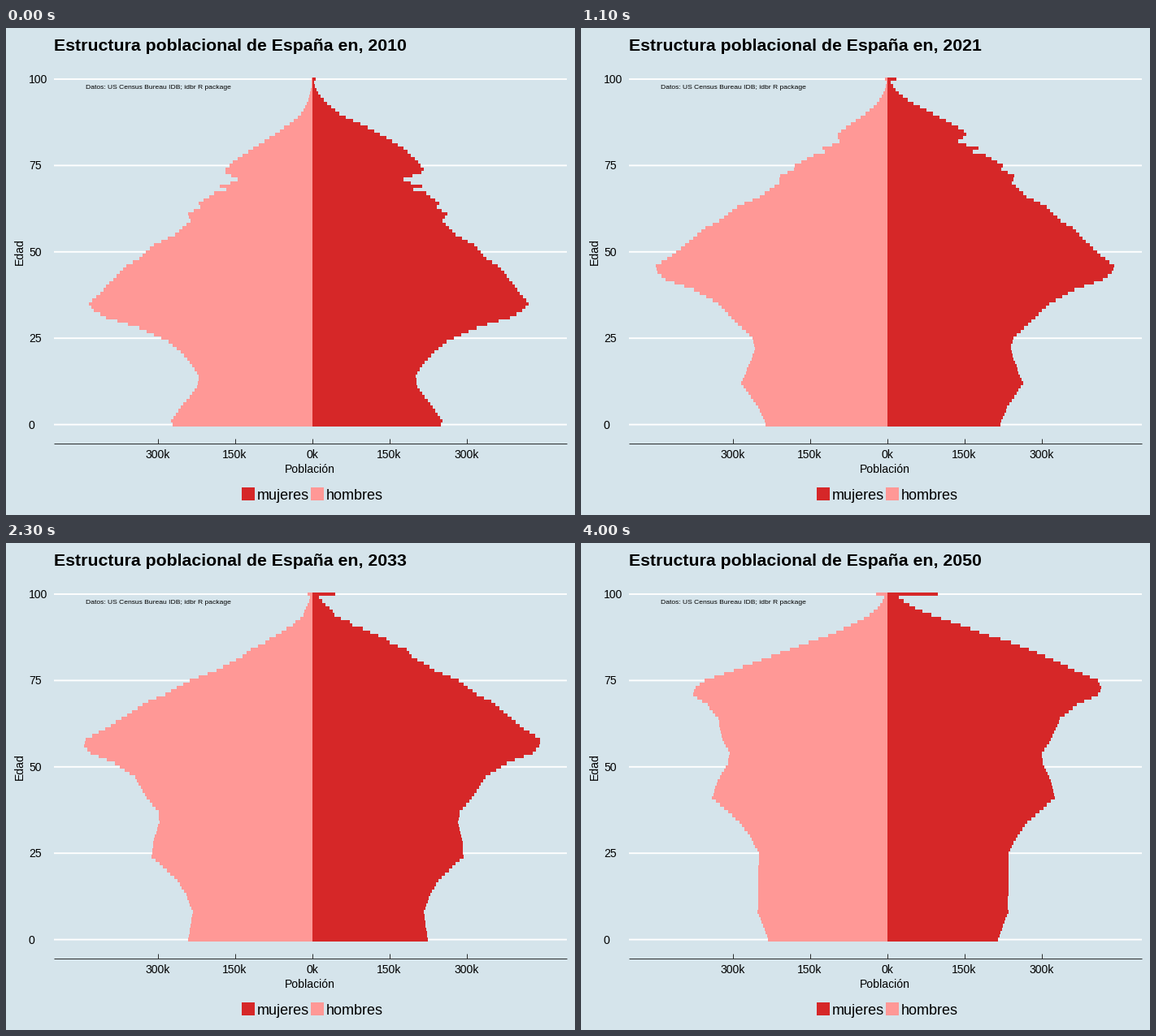
Recreate the animation shown at these times as a matplotlib script. Size 700 by 600 pixels, loop 4100 ms.

```python
import numpy as np
import matplotlib.pyplot as plt
from matplotlib.animation import FuncAnimation
from matplotlib.patches import Rectangle

plt.rcParams["font.family"] = "Liberation Sans"

W, H, DPI = 700, 600, 100
PT = 72 / DPI                      # points per pixel
BG, RED, PINK, INK = "#d5e4eb", "#d62728", "#ff9896", "#2b2e2f"
X0, LEFT, RIGHT = 377, 59, 690
Y0, STEP = 488.6, 4.256            # age 0 and pixels per year of age
AXIS_Y = 511.5
FIRST, LAST = 2010, 2050

# Birth year and full size of the cohort, as a bar length in pixels
COHORT_KEYS = [
    (1911, 85), (1920, 102), (1924, 130), (1930, 149), (1936, 155),
    (1937, 150), (1939, 122), (1940, 130), (1941, 144), (1942, 131),
    (1943, 147), (1946, 161), (1947, 157), (1949, 170), (1951, 163),
    (1955, 178), (1958, 201), (1962, 216), (1964, 231), (1968, 247),
    (1972, 265), (1975, 284), (1977, 283), (1979, 274), (1982, 242),
    (1986, 217), (1992, 204), (1996, 192), (1999, 193), (2004, 204),
    (2009, 210), (2012, 196), (2016, 178), (2020, 167), (2025, 159),
    (2036, 168), (2042, 171), (2050, 159)]
# Men per woman by birth year
RATIO_KEYS = [(1920, 0.72), (1934, 0.91), (1960, 1.005), (1976, 1.03),
              (2020, 1.055)]


def through(x, keys):
    return np.interp(x, *zip(*keys))


def arrivals(cohort, age):
    """Share of the full cohort present, growing as migrants arrive."""
    pull = 0.16 + 0.48 * np.exp(-((cohort - 1987) / 19) ** 2)
    missing = 1 / (1 + np.exp((age - 22) / 7))
    return pull * missing


def mortality(cohort, age, level, slope, progress):
    """Gompertz cumulative hazard that eases for later cohorts."""
    return level * np.exp(slope * (age - 80) - progress * (cohort - 1946))


def bar_lengths(year, male):
    age = np.arange(100)
    cohort = year - age
    u = (year - FIRST) / (LAST - FIRST)
    size = through(cohort, COHORT_KEYS)
    if male:
        size = size * through(cohort, RATIO_KEYS)
        loss = (0.87 * arrivals(cohort, age)
                + mortality(cohort, age, 0.51, 0.105, 0.005))
        oldest = 1 + 13 * u ** 1.6
    else:
        loss = (arrivals(cohort, age)
                + mortality(cohort, age, 0.24, 0.125, 0.011))
        oldest = 4 + 58 * u ** 1.6
    return np.round(np.append(size * np.exp(-loss), oldest))


def men_edge(year):
    return X0 - bar_lengths(year, male=True)


def women_edge(year):
    return X0 + bar_lengths(year, male=False)


fig = plt.figure(figsize=(W / DPI, H / DPI), dpi=DPI, facecolor=BG)
ax = fig.add_axes([0, 0, 1, 1])
ax.axis("off")


def label(x, y, text, size, **kw):
    return ax.text(x, y, text, fontsize=size * PT, va="baseline", **kw)


def line(xs, ys, color, width, **kw):
    ax.plot(xs, ys, color=color, lw=width * PT, solid_capstyle="butt", **kw)


def age_y(age):
    return Y0 - STEP * age


for age in range(0, 101, 25):
    y = age_y(age)
    line([LEFT, RIGHT], [y, y], "white", 1.9, zorder=1, snap=False)
    label(28, y + 5, str(age), 14)

edges = np.round(age_y(np.arange(102) - 0.5))
style = dict(orientation="horizontal", baseline=X0, fill=True, lw=0,
             antialiased=False, zorder=2)
men_bars = ax.stairs(men_edge(FIRST), edges, color=PINK, **style)
women_bars = ax.stairs(women_edge(FIRST), edges, color=RED, **style)

line([LEFT, RIGHT], [AXIS_Y, AXIS_Y], INK, 1)
for k in range(-2, 3):
    x = X0 - 0.5 + 95 * k
    line([x, x], [AXIS_Y - 6, AXIS_Y], INK, 1)
    label(x, 530, f"{abs(k) * 150}k", 14, ha="center")

label(374, 548, "Población", 14, ha="center")
label(21, 275.5, "Edad", 14, ha="center", rotation=90,
      rotation_mode="anchor")
label(98, 74.6, "Datos: US Census Bureau IDB; idbr R package", 8.5)

for x, color, name in [(290, RED, "mujeres"), (375, PINK, "hombres")]:
    ax.add_patch(Rectangle((x, 566), 16, 16, color=color, lw=0))
    label(x + 19, 581, name, 18)

title = label(LEFT, 28, "", 21.3, weight="bold")
ax.set_xlim(0, W)
ax.set_ylim(H, 0)


def update(i):
    year = FIRST + i
    title.set_text(f"Estructura poblacional de España en, {year}")
    men_bars.set_data(men_edge(year))
    women_bars.set_data(women_edge(year))
    return title, men_bars, women_bars


anim = FuncAnimation(fig, update, frames=LAST - FIRST + 1, interval=100,
                     repeat=True, repeat_delay=0)
plt.show()
```
